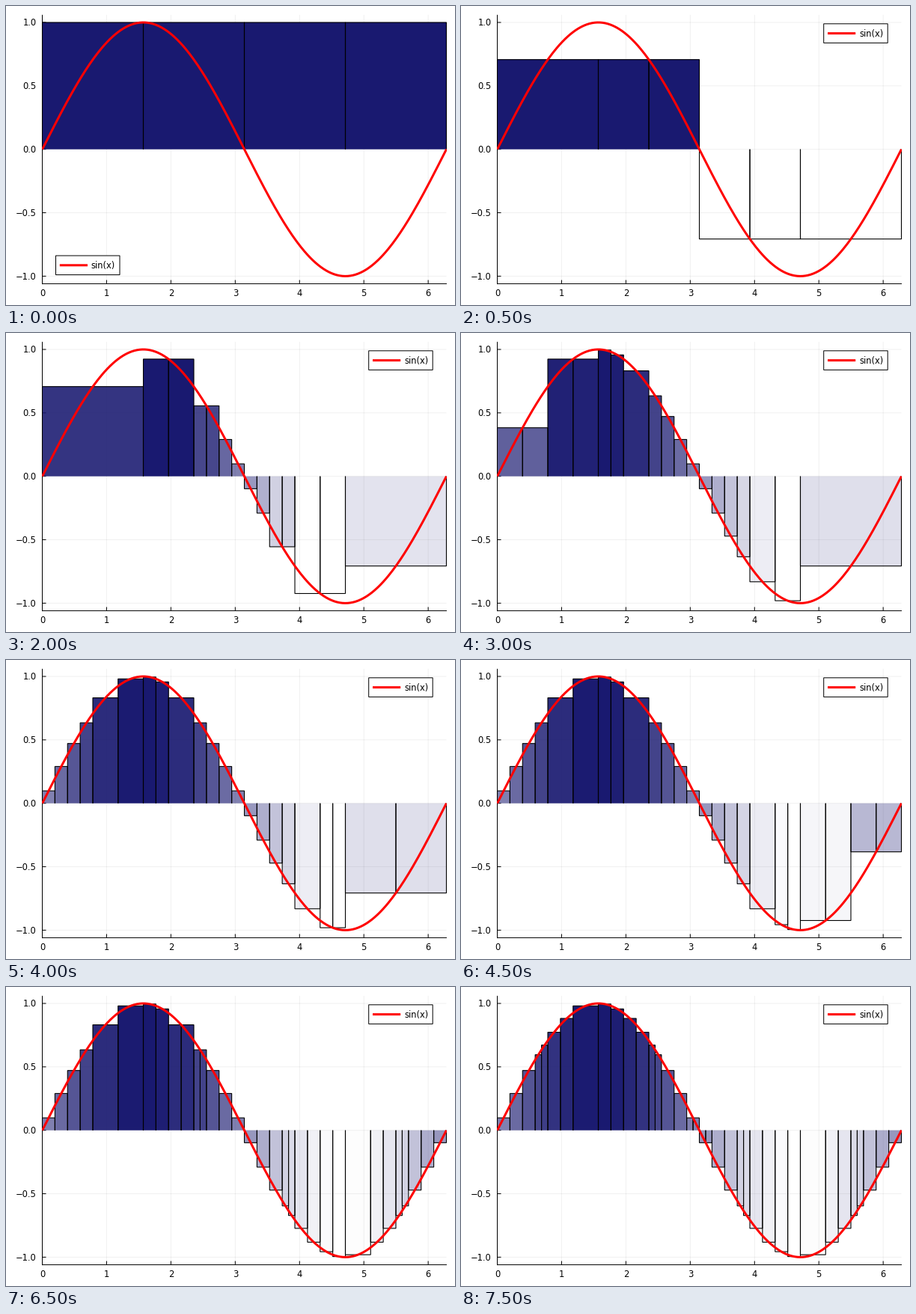
A matplotlib script for the animation above (8 s loop, 600x400 px).

```python
import numpy as np
import matplotlib.pyplot as plt
from matplotlib.animation import FuncAnimation
from matplotlib.patches import Rectangle

W, H, DPI = 600, 400, 100
PX = 72 / DPI                      # one pixel in points
LEFT, RIGHT, TOP, BOTTOM = 48.5, 588.5, 11.8, 371.6
NAVY = (25 / 255, 25 / 255, 112 / 255)
UNIT = np.pi / 64                  # cell edges are whole multiples of this

# Edges (in pi/8) whose two neighbouring cells are halved at each step
SPLITS = [(8,), (8,), (8,), (8,), (6, 10), (4,), (2,), (1,),
          (12,), (14,), (15,), (14,), (10,), (6,), (2,), (8,)]

plt.rcParams["font.family"] = "DejaVu Sans"
plt.rcParams["path.snap"] = False


def sx(x):
    return LEFT + (RIGHT - LEFT) * x / (2 * np.pi)


def sy(y):
    return (TOP + BOTTOM) / 2 - (BOTTOM - TOP) / 2.12 * y


def refine(cells, edges):
    """Halve the cells touching the given edges; children keep the value."""
    out = []
    for a, b, u in cells:
        if any(8 * e in (a, b) for e in edges):
            mid = (a + b) // 2
            out += [(a, mid, u), (mid, b, u)]
        else:
            out.append((a, b, u))
    return out


def build_steps():
    cells = refine([(0, 64, 1.0), (64, 128, 1.0)], SPLITS[0])
    steps = [cells]
    for edges in SPLITS[1:]:
        cells = [(a, b, np.sin((a + b) / 2 * UNIT)) for a, b, _ in cells]
        cells = refine(cells, edges)
        steps.append(cells)
    return steps


STEPS = build_steps()

fig = plt.figure(figsize=(W / DPI, H / DPI), dpi=DPI, facecolor="white")
ax = fig.add_axes([0, 0, 1, 1])
ax.set_xlim(0, W)
ax.set_ylim(H, 0)
ax.axis("off")
frame_box = Rectangle((LEFT - 0.5, TOP), RIGHT - LEFT + 1, BOTTOM - TOP,
                      transform=ax.transData)


def line(xs, ys, width=1.0, color="black", z=1, **kw):
    return ax.plot(xs, ys, color=color, lw=width * PX, zorder=z,
                   solid_capstyle="butt", **kw)[0]


def label(x, y, s, ha, z=1):
    return ax.text(x, y, s, ha=ha, va="baseline", fontsize=8.3, zorder=z)


def draw_axes():
    for k in range(7):
        x = sx(k)
        line([x, x], [TOP, BOTTOM], alpha=0.06, z=0)
        line([x, x], [BOTTOM, BOTTOM - 5])
        label(x, 387.7, str(k), "center")
    for v in (-1, -0.5, 0, 0.5, 1):
        y = sy(v)
        line([LEFT, RIGHT], [y, y], alpha=0.06, z=0)
        line([LEFT, LEFT + 5], [y, y])
        label(40.5, y + 4.2, f"{v:.1f}".replace("-", "\u2212"), "right")
    line([LEFT, LEFT], [TOP, BOTTOM + 0.5])
    line([LEFT - 0.5, RIGHT + 0.5], [BOTTOM, BOTTOM])


def draw_curve():
    t = np.linspace(0, 2 * np.pi, 300)
    curve = line(sx(t), sy(np.sin(t)), 3, "red", z=5)
    curve.set_clip_path(frame_box)


def draw_legend(x, y):
    box = Rectangle((x, y), 85.5, 25.6, fc="white", ec="black",
                    lw=PX, zorder=6)
    ax.add_patch(box)
    key = line([x + 5.3, x + 42.5], [y + 12.8, y + 12.8], 3, "red", z=7)
    return [box, key, label(x + 47.3, y + 17, "sin(x)", "left", z=7)]


def draw_cells(cells):
    values = [u for _, _, u in cells]
    low, span = min(values), max(values) - min(values)
    made = []
    for a, b, u in cells:
        x0, x1, y0, y1 = sx(a * UNIT), sx(b * UNIT), sy(0), sy(u)
        shade = (u - low) / span if span else 1.0
        made += ax.fill([x0, x0, x1, x1], [y0, y1, y1, y0], fc=NAVY,
                        alpha=shade, lw=0, zorder=2)
        made.append(line([x0, x0, x1, x1], [y0, y1, y1, y0], 1.1, z=3,
                         solid_joinstyle="miter"))
    return made


draw_axes()
draw_curve()
shown = []


def update(i):
    while shown:
        shown.pop().remove()
    shown.extend(draw_cells(STEPS[i]))
    shown.extend(draw_legend(*((66.5, 334) if i == 0 else (484.7, 23.8))))
    return shown


anim = FuncAnimation(fig, update, frames=len(STEPS), interval=500,
                     init_func=lambda: update(0), repeat=True,
                     repeat_delay=0, blit=False)
plt.show()
```
